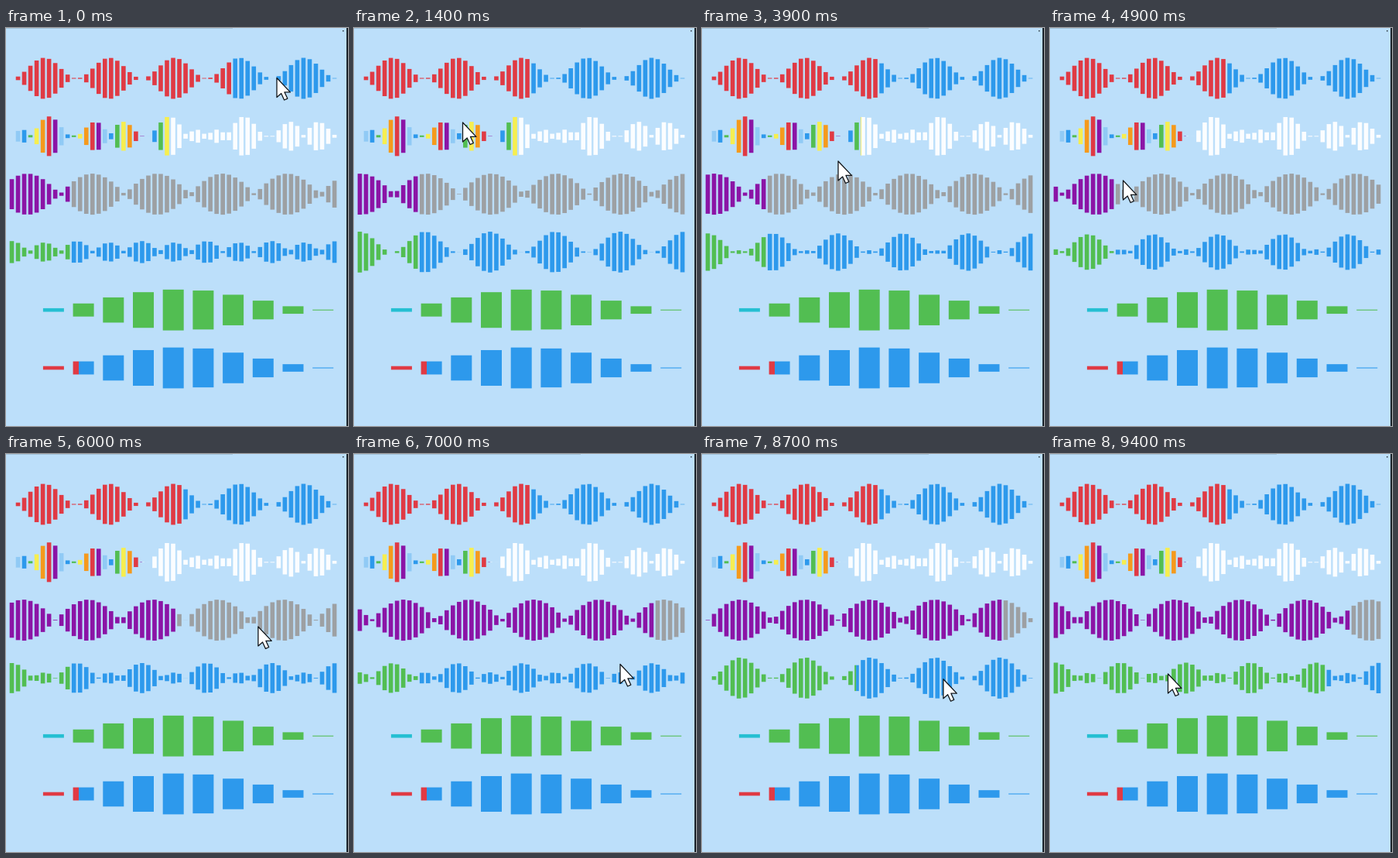
An HTML page for the animation above (9500 ms loop, 442 by 514 pixels).

```html
<!DOCTYPE html>
<html lang="en">
<head>
<meta charset="utf-8">
<title>Audio waveforms</title>
<style>
html, body { margin: 0; width: 442px; height: 514px; overflow: hidden; background: #bcdffa; }
svg { display: block; }
#bars { filter: blur(.6px); }
</style>
</head>
<body>
<svg id="stage" width="442" height="514" viewBox="0 0 442 514">
  <rect width="442" height="514" fill="#bcdffa"/>
  <rect width="293" height="1" fill="#a3c3d9"/>
  <rect x="435" y="3" width="1.5" height="1.5" fill="#26323a"/>
  <rect x="440" width="2" height="514" fill="#1c242b"/>
  <g id="bars"></g>
  <path id="cursor" d="M0 0V25L5.7 20L9.6 28.5L13.8 26.6L10 18.4H17.4Z" fill="#fff" stroke="#10151a" stroke-width="1.3" stroke-linejoin="round"/>
</svg>
<script>
const LOOP = 9500, STEP = 100, PEAK = 53, LAG = .5;
const RED = '#e03a44', BLUE = '#2d99ec', GREEN = '#52be52', PURPLE = '#8b14a6',
      GREY = '#9da0a3', CYAN = '#25bfd2', WHITE = '#fbfdff';
const RAINBOW = ['#90caf5', BLUE, GREEN, '#f6ee50', '#f59a1c', RED, PURPLE];
const { sin, cos, abs, min, max } = Math;

// Keys are [seconds, value, ...], joined by straight lines.
function at(keys, t, k = 1) {
  const n = keys.findIndex(key => t <= key[0]);
  if (n < 1) return keys.at(n)[k];
  const a = keys[n - 1], b = keys[n];
  return a[k] + (b[k] - a[k]) * (t - a[0]) / (b[0] - a[0]);
}

// Crest of the travelling wave, in bars; it slows down once early on
const crest = [[0, 2.5], [1.4, 10.72], [2.9, 16.5], [4.9, 27.43], [7, 38.5], [9.4, 50.62]];

const pointer = [
  [-LAG, 292, 64.5], [0, 350, 64.5], [.8, 228, 92], [1.4, 140.5, 122], [2.4, 92, 140],
  [2.9, 236, 150.5], [3.9, 176, 172], [4.9, 94.5, 197], [6.3, 389, 230],
  [7, 344, 271.5], [8, 154, 293.5], [8.9, 357, 290], [9.4, 152.5, 284]
];

// A row's played edge trails the pointer while that is over the row.
function playedTo({ start, hover }, t) {
  const late = t - LAG;
  return hover && late >= hover[0] ? at(pointer, min(late, hover[1])) : start;
}

const still = i => sin(.3 * i) ** 2;
const fine = { count: 53, x: 7.5, pitch: 8.02, width: 5.6 };
const wide = { count: 11, x: 22.7, pitch: 38.7, width: 27 };

const rows = [
  { ...fine, base: BLUE, fill: () => RED, wave: still, hover: [-LAG, .8] },
  { ...fine, base: WHITE, fill: i => RAINBOW[(i + 6) % 7], start: 212, hover: [.9, 3.9],
    wave: i => abs(sin(.3 * i) * cos(.5 * i)) },
  { ...fine, base: GREY, fill: () => PURPLE, start: 84, hover: [4.9, 6.3],
    wave: (i, p) => abs(cos(.3 * i - p)) },
  { ...fine, base: BLUE, fill: () => GREEN, start: 84, hover: [7, 8.9],
    wave: (i, p) => abs(cos(.3 * i - p) * cos(.3 * i + p)) },
  { ...wide, base: GREEN, fill: () => CYAN, wave: still, start: 80 },
  { ...wide, base: BLUE, fill: () => RED, wave: still, start: 94 }
];

const group = document.getElementById('bars');
const cursor = document.getElementById('cursor');

function set(el, attrs) {
  for (const key in attrs) el.setAttribute(key, attrs[key]);
}

function addRect(fill) {
  const el = document.createElementNS('http://www.w3.org/2000/svg', 'rect');
  set(el, { fill });
  return group.appendChild(el);
}

rows.forEach((row, n) => {
  row.y = 65 + 74.8 * n;
  row.bars = Array.from({ length: row.count }, (_, i) => ({
    left: row.x + row.pitch * i - row.width / 2,
    rest: addRect(row.base),
    done: addRect(row.fill(i))
  }));
});

function draw(t) {
  const phase = .3 * at(crest, t);
  for (const row of rows) {
    const edge = playedTo(row, t);
    row.bars.forEach(({ left, rest, done }, i) => {
      const height = PEAK * row.wave(i, phase);
      const y = row.y - height / 2;
      const cut = max(0, min(row.width, edge - left));
      set(done, { x: left, y, width: cut, height });
      set(rest, { x: left + cut, y, width: row.width - cut, height });
    });
  }
  set(cursor, { transform: `translate(${at(pointer, t, 1)} ${at(pointer, t, 2)})` });
}

const start = performance.now();
function tick(now) {
  const ms = max(0, now - start) % LOOP;
  draw(Math.floor(ms / STEP) * STEP / 1000);
  requestAnimationFrame(tick);
}
draw(0);
requestAnimationFrame(tick);
</script>
</body>
</html>
```
